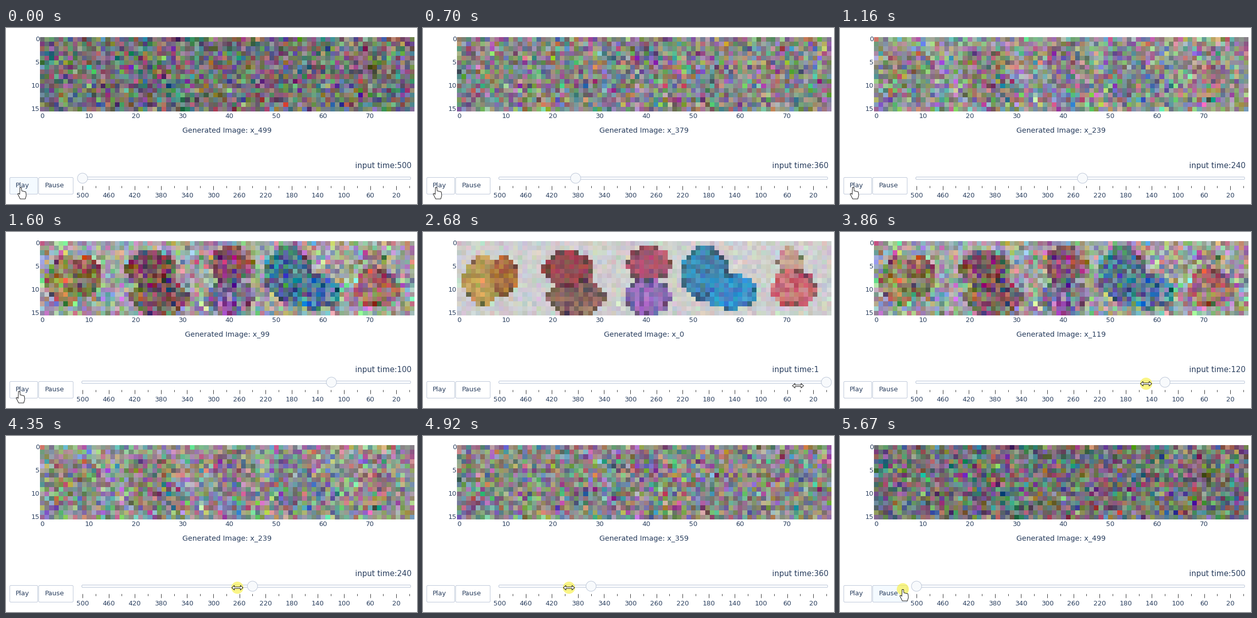
Write a matplotlib script that moves like this. It is 811 by 348 pixels and loops after 5810 ms.

```python
import numpy as np
import matplotlib.pyplot as plt
from matplotlib.animation import FuncAnimation
from matplotlib.colors import to_rgb
from matplotlib.patches import Circle, FancyBboxPatch, Polygon

W, H, DPI = 811, 348, 64
LOOP, STEP_MS = 5810, 35
INK, EDGE, PALE = "#2a3f5f", "#bec8d9", "#f8fafc"
HOVER, YELLOW, PAPER = "#f4faff", "#f8f03c", "#d0cdd1"
COLS, ROWS, LAST = 80, 16, 25
LEFT, RIGHT, TOP, BOTTOM = 67, 806, 18, 165
RAIL_X, RAIL_STEP = 151, 25.8

plt.rcParams["font.family"] = "DejaVu Sans"
rng = np.random.default_rng(11)


def pt(px):
    return px * 72 / DPI


fig = plt.figure(figsize=(W / DPI, H / DPI), dpi=DPI, facecolor="white")
ax = fig.add_axes([0, 0, 1, 1])
ax.axis("off")


# ---- pictures: each sprite is two speckled ellipses on pale paper ----
def blob(pic, cx, cy, rx, ry, color, fleck):
    yy, xx = np.mgrid[0:ROWS, 0:COLS]
    depth = np.hypot((xx - cx) / rx, (yy - cy) / ry)
    mix = rng.random((ROWS, COLS, 1))
    fill = to_rgb(color) + mix * np.subtract(to_rgb(fleck), to_rgb(color))
    rim = (depth > 0.8) & (rng.random(depth.shape) < 0.4)
    fill[rim] = fill[rim] * 0.55 + 0.08
    pic[depth <= 1] = fill[depth <= 1]


clean = np.ones((ROWS, COLS, 3)) * to_rgb(PAPER)
blob(clean, 5, 8, 4.3, 5.3, "#d8a866", "#a08a50")
blob(clean, 9.8, 7, 2.9, 4.2, "#c8803c", "#8f5a48")
blob(clean, 25, 11.5, 6.3, 4, "#b08070", "#64505a")
blob(clean, 23.2, 5.5, 5.3, 3.9, "#b04454", "#885058")
blob(clean, 40.5, 4.5, 4.8, 4, "#c85878", "#8f5a70")
blob(clean, 40.3, 11.5, 4.8, 4, "#b070c8", "#6a64a8")
blob(clean, 52.5, 6.5, 5, 6, "#3a9cd0", "#4a7098")
blob(clean, 58, 10.3, 5.6, 3.9, "#30a4d4", "#4878c0")
blob(clean, 70.6, 4, 2.6, 3.4, "#d4b0a0", "#b88c88")
blob(clean, 71.5, 9.6, 4.9, 4, "#c04c60", "#d08890")


def make_pictures():
    """Noisy pictures, from pure noise (index 0) to the clean one (LAST)."""
    noise = rng.normal(size=clean.shape)
    pics = []
    for k in range(LAST + 1):
        t = 500 - 20 * k
        keep = np.exp(-(t / 170) ** 1.5)
        spread = 0.035 + 0.09 * (1 - np.exp(-t / 40))
        level = np.interp(t, [0, 100, 380, 500], [0.81, 0.64, 0.53, 0.45])
        pic = level + keep * (clean - to_rgb(PAPER)) + spread * noise
        pics.append(np.clip(pic, 0, 1))
        fade = np.exp(-0.0004 * t)
        noise = fade * noise + np.sqrt(1 - fade ** 2) * rng.normal(size=clean.shape)
    return pics


pictures = make_pictures()
image = ax.imshow(pictures[0], extent=(LEFT, RIGHT, BOTTOM, TOP),
                  interpolation="nearest", aspect="auto")
ax.set_xlim(0, W)
ax.set_ylim(H, 0)


# ---- fixed parts ----
def label(x, y, text, size=13, ha="center"):
    return ax.text(x, y, text, fontsize=pt(size), color=INK, ha=ha,
                   va="baseline", zorder=5)


def box(x0, y0, x1, y1, fill):
    shape = FancyBboxPatch((x0, y0), x1 - x0, y1 - y0, fc=fill, ec=EDGE,
                           boxstyle="round,pad=0,rounding_size=2",
                           lw=pt(1), zorder=2)
    return ax.add_patch(shape)


cell_w, cell_h = (RIGHT - LEFT) / COLS, (BOTTOM - TOP) / ROWS
for c in range(0, COLS, 10):
    label(LEFT + (c + 0.5) * cell_w, 178, str(c))
for r in range(0, ROWS, 5):
    label(66, TOP + (r + 0.5) * cell_h + 3.5, str(r), ha="right")

for k in range(LAST + 1):
    x = np.floor(RAIL_X - 0.5 + k * RAIL_STEP) + 0.5
    major = k % 2 == 0
    ax.plot([x, x], [312, 320 if major else 316], color="#333333", lw=pt(1),
            solid_capstyle="butt")
    if major:
        label(RAIL_X + k * RAIL_STEP, 335, str(500 - 20 * k))

play = box(7.5, 295.5, 62.5, 328.5, "white")
pause = box(64.5, 295.5, 132.5, 328.5, "white")
label(19, 315, "Play", ha="left")
label(76.5, 315, "Pause", ha="left")
box(149.5, 294.5, 798.5, 299.5, PALE)

# ---- moving parts ----
title = label(436.5, 207, "", 14.2)
status = label(689, 277, "", 15, "left")
handle = ax.add_patch(Circle((RAIL_X, 297), 10, fc=PALE, ec=EDGE, lw=pt(1),
                             zorder=3))
glow = ax.add_patch(Circle((0, 0), 12, fc=YELLOW, ec="none", alpha=0.62,
                           zorder=6))

HAND = np.array([(-1.5, 0.5), (1.5, 0.5), (2, 7), (10, 9), (11, 16), (9, 23),
                 (-1, 23), (-6, 13), (-4, 12), (-2, 14)])
corner = np.array([(11, 0), (6, 4.5), (6, 1.5)])
half = np.vstack([corner, corner[::-1] * (-1, 1)])
ARROWS = np.vstack([half, half[::-1] * (1, -1)])
cursor = ax.add_patch(Polygon(HAND, fc="white", ec="black", lw=pt(0.9),
                              joinstyle="round", zorder=7))

# time, x, y of the pointer: rest on Play, glide right, drag back left
PATH = np.array([
    (0, 29, 315), (140, 26, 315), (1940, 26, 315), (2090, 175, 303),
    (2660, 740, 304), (2730, 788, 298), (3170, 788, 298),
    (3850, 604, 300), (4900, 288, 300), (5600, 127, 302), (5670, 124, 303)])
CLICK_START, CLICK_END = 140, 280
PRESS, DRAG_LAG = 2960, 100


def pointer(t):
    return np.array([np.interp(t, PATH[:, 0], PATH[:, i]) for i in (1, 2)])


def slider(t):
    """Handle position, status index and picture index."""
    if t < PRESS:
        pos = 5.82 + (t - 700) / 66.2
        named, shown = int(np.floor(pos + 1.3)), int(np.floor(pos + 1))
    else:
        x = pointer(t - DRAG_LAG)[0]
        pos = named = shown = int(round((x - RAIL_X) / RAIL_STEP + 0.3))
    return [min(max(v, 0), LAST) for v in (pos, named, shown)]


def draw(n):
    t = n * STEP_MS
    pos, named, shown = slider(t)
    image.set_data(pictures[shown])
    title.set_text(f"Generated Image: x_{max(499 - 20 * shown, 0)}")
    status.set_text(f"input time:{max(500 - 20 * named, 1)}")
    handle.center = (RAIL_X + pos * RAIL_STEP, 297)

    tip = pointer(t)
    is_hand = tip[0] < 139
    cursor.set_xy(tip + (HAND if is_hand else ARROWS))
    glow.center = tuple(tip)
    glow.set_visible(CLICK_START <= t < CLICK_END or t >= PRESS)
    play.set_facecolor(HOVER if t < CLICK_END else "white")
    pause.set_facecolor(HOVER if t > 5600 else "white")
    return image, title, status, handle, cursor, glow, play, pause


anim = FuncAnimation(fig, draw, frames=LOOP // STEP_MS, interval=STEP_MS,
                     init_func=lambda: draw(0), repeat=True, repeat_delay=0,
                     blit=False)
plt.show()
```
